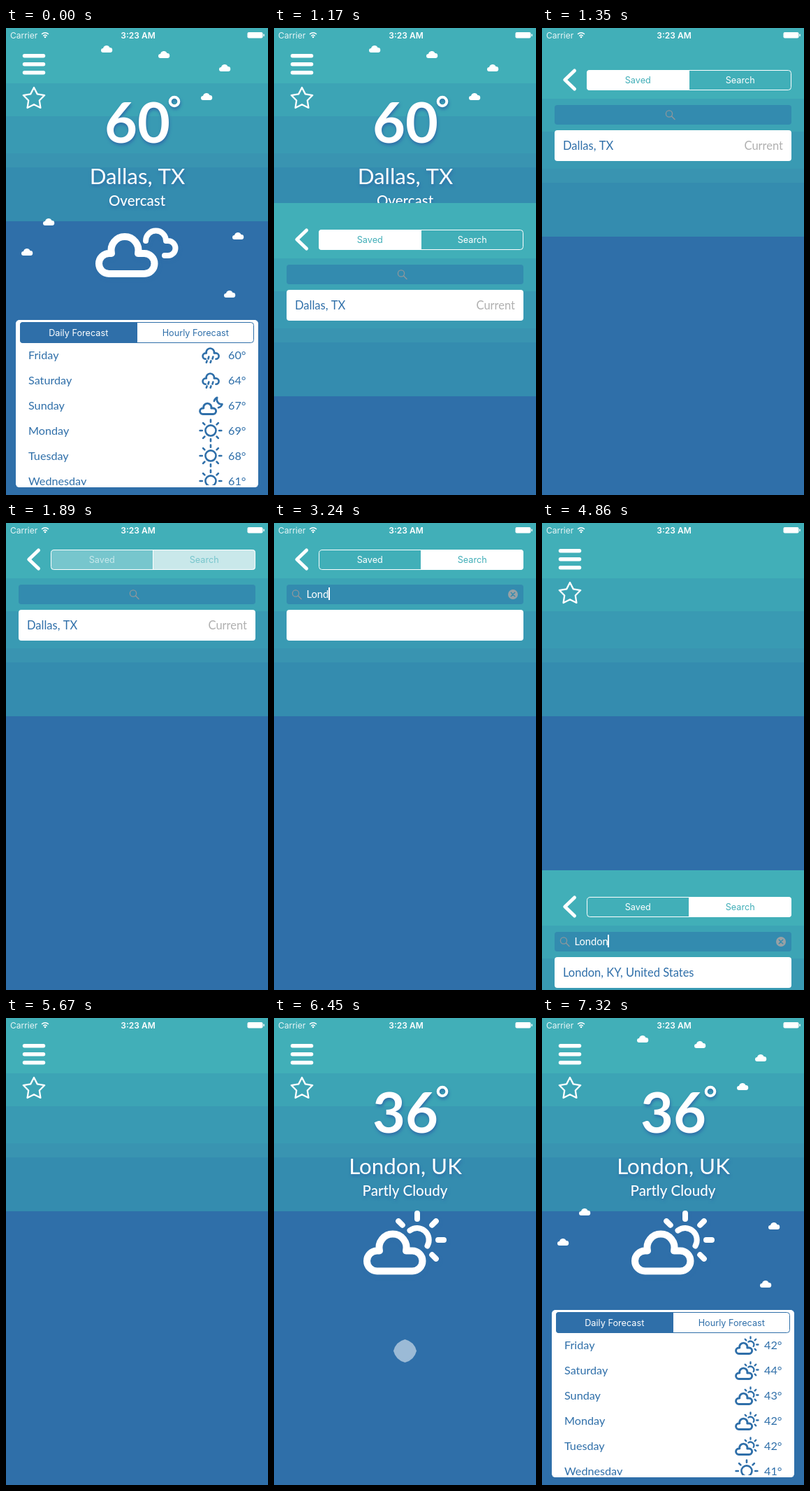
Write an HTML page with a canvas that moves like this. It is 375x667 px and loops after 8 s.

```html
<!DOCTYPE html>
<html lang="en">
<head>
<meta charset="utf-8">
<title>Weather</title>
<style>
  html, body { margin: 0; width: 100%; height: 100%; overflow: hidden; background: #2f6fa9; }
  canvas { display: block; }
</style>
</head>
<body>
<canvas id="stage" width="375" height="667"></canvas>
<script>
const ctx = document.getElementById('stage').getContext('2d');
const LOOP = 8000, BLUE = '#2f6fa9', TEAL = [64, 174, 184], WHITE = [255, 255, 255];
const BODY = 'Lato, sans-serif', UI = 'Inter, sans-serif';
const DAYS = ['Friday', 'Saturday', 'Sunday', 'Monday', 'Tuesday', 'Wednesday'];
const RESULTS = ['London, KY, United States', 'London, United Kingdom', 'London, ON, Canada',
  'Londonderry, NH, United States', 'London, OH, United States'];
const DALLAS = { now: 60, city: 'Dallas, TX', sky: 'Overcast', icon: 'overcast', temps: [60, 64, 67, 69, 68, 61],
  icons: ['rain', 'rain', 'night', 'sun', 'sun', 'sun'] };
const LONDON = { now: 36, city: 'London, UK', sky: 'Partly Cloudy', icon: 'partly', temps: [42, 44, 43, 42, 42, 41],
  icons: ['partly', 'partly', 'partly', 'partly', 'partly', 'sun'] };
const SMALL_CLOUDS = [[144, 30], [226, 38], [313, 57], [287, 98], [61, 277], [30, 320], [332, 297], [320, 380]];

// Timing helpers
const ramp = (t, from, to) => Math.min(1, Math.max(0, (t - from) / (to - from)));
const lerp = (a, b, p) => a + (b - a) * p;
const smooth = p => p * p * (3 - 2 * p);
const easeOut = p => 1 - (1 - p) ** 3;
const mix = (a, b, p) => `rgb(${a.map((v, i) => Math.round(lerp(v, b[i], p)))})`;
const bezier = (a, b, u) => 3 * a * u * (1 - u) ** 2 + 3 * b * u * u * (1 - u) + u ** 3;
function sheetEase(x) {
  let lo = 0, hi = 1;
  for (let i = 0; i < 24; i++) {
    const mid = (lo + hi) / 2;
    if (bezier(.38, .125, mid) < x) lo = mid; else hi = mid;
  }
  return bezier(.7, 1, lo);
}

// Drawing helpers
function group(alpha, draw) {
  if (alpha <= 0) return;
  ctx.save();
  ctx.globalAlpha *= alpha;
  draw();
  ctx.restore();
}
function text(str, x, y, font, color = '#fff', align = 'left') {
  ctx.font = font;
  ctx.fillStyle = color;
  ctx.textAlign = align;
  ctx.fillText(str, x, y);
}
function box(x, y, w, h, r, fill) {
  ctx.beginPath();
  ctx.roundRect(x, y, w, h, r);
  if (fill) { ctx.fillStyle = fill; ctx.fill(); }
}
function stroke(path, width, color = '#fff') {
  ctx.lineWidth = width;
  ctx.strokeStyle = color;
  ctx.lineCap = ctx.lineJoin = 'round';
  ctx.stroke(new Path2D(path));
}
function circle(x, y, r, fill) {
  ctx.beginPath();
  ctx.arc(x, y, r, 0, 7);
  if (fill) { ctx.fillStyle = fill; ctx.fill(); }
}
function shadow() {
  ctx.shadowColor = BLUE;
  ctx.shadowBlur = 4;
  ctx.shadowOffsetX = 1;
  ctx.shadowOffsetY = 3;
}

function background() {
  [[0, '#41afb8'], [79, '#3ca4b5'], [126, '#399ab3'], [179, '#3994b1'], [199, '#348caf'], [276, BLUE]]
    .forEach(([y, color]) => { ctx.fillStyle = color; ctx.fillRect(0, y, 375, 667 - y); });
}

// Weather icons share one coordinate space
const CLOUD = 'M147.5 351A14.5 14.5 0 0 1 147.5 322H151A19.5 19.5 0 1 1 189 322H198A14.5 14.5 0 0 1 198 351';
function rays(from, to, first, last) {
  let path = '';
  for (let i = first; i <= last; i++) {
    const c = Math.cos(i * Math.PI / 4), s = Math.sin(i * Math.PI / 4);
    path += `M${205 + c * from} ${317 + s * from}L${205 + c * to} ${317 + s * to}`;
  }
  return path;
}
function weatherIcon(kind, x, y, scale, color) {
  ctx.save();
  ctx.translate(x, y);
  ctx.scale(scale, scale);
  if (kind === 'overcast') {
    stroke(CLOUD + 'Z', 10, color);
    stroke('M200 304A14.5 14.5 0 0 1 229 304H232A10.5 10.5 0 0 1 232 325H227', 8, color);
  } else if (kind === 'rain') {
    stroke(CLOUD, 9, color);
    stroke('M163 340l-3 10M184 340l-3 10M154 360l-3 8M174 360l-3 8', 9, color);
  } else if (kind === 'sun') {
    stroke('M231 317A26 26 0 1 1 179 317A26 26 0 1 1 231 317Z' + rays(42, 53, 0, 7), 9, color);
  } else {
    if (kind === 'partly') stroke('M194.5 303.5A17 17 0 0 1 219.5 325.5' + rays(30, 38, -3, 1), 8, color);
    else stroke('M203 298A27 27 0 0 1 218 280A24 24 0 0 0 243 313A27 27 0 0 1 224 330', 9, color);
    ctx.translate(0, 10.5);
    stroke(CLOUD + 'Z', 10, color);
  }
  ctx.restore();
}
const ICON_OFFSET = { rain: [243, -96], sun: [233.5, -92], night: [239, -92.4], partly: [239, -92.4] };

function smallCloud(x, y) {
  ctx.fillStyle = '#fff';
  ctx.fill(new Path2D(`M${x - 5} ${y + 5}a3 3 0 0 1 0-6a5 5 0 0 1 9.5-1a3.5 3.5 0 0 1 .5 7Z`));
}

function segments(x, y, w, h, labels, selected, on, off, baseline) {
  const half = w / 2;
  group(1 - selected, () => box(x, y, half, h, [4, 0, 0, 4], on));
  group(selected, () => box(x + half, y, half, h, [0, 4, 4, 0], on));
  box(x + .5, y + .5, w - 1, h - 1, 4);
  ctx.lineWidth = 1;
  ctx.strokeStyle = on;
  ctx.stroke();
  ctx.fillStyle = on;
  ctx.fillRect(x + half - .5, y, 1, h);
  labels.forEach((label, i) =>
    text(label, x + half * (i + .5), baseline, `12.7px ${UI}`, off(i ? 1 - selected : selected), 'center'));
}

function statusBar(t) {
  text('Carrier', 6, 14.5, `12px ${UI}`, 'rgba(255,255,255,.88)');
  text('3:23 AM', 189, 14.5, `600 12px ${UI}`, '#fff', 'center');
  stroke('M51.5 8.5A6.5 6.5 0 0 1 60.5 8.5M53.7 11A3.6 3.6 0 0 1 58.3 11', 1.5);
  circle(56, 13, 1.3, '#fff');
  box(345.5, 6, 22, 8.5, 2, '#fff');
  box(368.4, 8.5, 1.4, 3.5, 1, '#fff');
  const start = t >= 5370 && t < 5670 ? 5370 : t >= 3450 && t < 3660 ? 3450 : 0;
  if (!start) return;
  const step = Math.floor((t - start) / 150);
  for (let i = 0; i < 12; i++) {
    const a = (i + step) * Math.PI / 6, c = Math.cos(a), s = Math.sin(a);
    group(.25 + i / 16, () => stroke(`M${74 + c * 2.6} ${10 + s * 2.6}L${74 + c * 4.6} ${10 + s * 4.6}`, 1));
  }
}

function menu(t) {
  group(t >= 960 && t < 1043 ? .5 : 1, () => stroke('M26.5 39.8H53.5M26.5 51.8H53.5M26.5 63.8H53.5', 5.5));
  let star = '';
  for (let i = 0; i < 10; i++) {
    const a = (i / 5 - .5) * Math.PI, r = i % 2 ? 8.2 : 16;
    star += `${i ? 'L' : 'M'}${40 + r * Math.cos(a)} ${101 + r * Math.sin(a)}`;
  }
  stroke(star + 'Z', 2.3);
}

function summary(place, alpha) {
  group(alpha, () => {
    shadow();
    text(place.now, 188, 163.5, `bold 81px ${BODY}`, '#fff', 'center');
    circle(241, 105, 6.3);
    ctx.lineWidth = 4;
    ctx.strokeStyle = '#fff';
    ctx.stroke();
    text(place.city, 188, 222.5, `31.3px ${BODY}`, '#fff', 'center');
    text(place.sky, 187.5, 253.5, `500 20.5px ${BODY}`, '#fff', 'center');
    weatherIcon(place.icon, 0, 26 * (1 - alpha), 1, '#fff');
  });
}

function forecast(place, grow, alpha) {
  const w = lerp(33, 347, grow), h = lerp(33, 239, grow);
  const cx = 187.5, cy = lerp(475.5, 536.5, grow), r = lerp(16.5, 4, grow), k = r * .2;
  const l = cx - w / 2, right = cx + w / 2, top = cy - h / 2, b = cy + h / 2;
  const card = new Path2D(`M${l + r} ${top}H${right - r}Q${right - k} ${top + k} ${right} ${top + r}
    V${b - r}Q${right - k} ${b - k} ${right - r} ${b}H${l + r}Q${l + k} ${b - k} ${l} ${b - r}
    V${top + r}Q${l + k} ${top + k} ${l + r} ${top}Z`);
  group(lerp(.52, 1, grow), () => { ctx.fillStyle = '#fff'; ctx.fill(card); });
  group(alpha, () => {
    ctx.clip(card);
    segments(20, 420, 335, 30, ['Daily Forecast', 'Hourly Forecast'], 0, BLUE,
      p => mix(WHITE, [47, 111, 169], p), 439.5);
    box(14, 451, 347, 202, 0);
    ctx.clip();
    DAYS.forEach((day, i) => {
      const y = 467 + 36 * i, kind = place.icons[i], [dx, dy] = ICON_OFFSET[kind];
      text(day, 32, y + 6, `16.2px ${BODY}`, BLUE);
      text(place.temps[i] + '°', 318, y + 6, `16.2px ${BODY}`, BLUE);
      weatherIcon(kind, dx, y + dy, .29, BLUE);
    });
  });
}

function home(t) {
  background();
  menu(t);
  if (t < 3000) {
    SMALL_CLOUDS.forEach(([x, y]) => smallCloud(x, y));
    summary(DALLAS, 1);
    forecast(DALLAS, 1, 1);
    return;
  }
  summary(LONDON, easeOut(ramp(t, 5880, 6270)));
  if (t < 6450) return;
  const slide = easeOut(ramp(t, 6450, 7230));
  group(ramp(t, 6450, 7320), () => SMALL_CLOUDS.forEach(([x, y]) =>
    smallCloud(lerp(x < 187 ? -10 : 385, x, slide), y)));
  forecast(LONDON, smooth(ramp(t, 6450, 7050)), ramp(t, 6900, 7320));
}

function cursorAlpha(t) {
  return t < 2250 ? 0 : t < 4650 ? 1 - ramp(t, 4140, 4290) : ramp(t, 4650, 4800);
}

function searchSheet(t) {
  background();
  stroke('M46.5 39L32.8 52L46.5 65', 5);
  segments(64, 38, 293, 29, ['Saved', 'Search'], ramp(t, 1740, 1950), '#fff',
    p => mix(TEAL, WHITE, p), 57);

  box(18, 88, 339, 28, 4, '#338baf');
  const iconX = lerp(182, 31, smooth(ramp(t, 1950, 2250)));
  circle(iconX, 100.5, 4.6);
  ctx.lineWidth = 1.3;
  ctx.strokeStyle = '#8d979c';
  ctx.stroke();
  stroke(`M${iconX + 3.5} 104l4.5 4.5`, 1.5, '#8d979c');
  const typed = t < 2880 ? '' : 'London'.slice(0, 1 + Math.floor((t - 2880) / 110));
  text(typed, 46.5, 106.5, `14.7px ${BODY}`);
  const caret = Math.round(46 + ctx.measureText(typed).width);
  group(cursorAlpha(t), () => { ctx.fillStyle = '#fff'; ctx.fillRect(caret, 92, 2, 18); });
  if (typed) {
    circle(342, 102, 7, '#98a1a5');
    stroke('M339.3 99.3l5.4 5.4M344.7 99.3l-5.4 5.4', 1.5, '#338baf');
  }

  const open = smooth(ramp(t, 3505, 3870)) - smooth(ramp(t, 4650, 4840));
  box(18, 124, 339, lerp(44, 220, open), 4, '#fff');
  ctx.save();
  ctx.clip();
  const leave = ramp(t, 1950, 2340), rowFont = `16.5px ${BODY}`;
  group(1 - leave, () => {
    const x = -100 * smooth(leave);
    text('Dallas, TX', 30 + x, 151.5, rowFont, BLUE);
    text('Current', 345 + x, 151.5, rowFont, '#b0b0b0', 'right');
  });
  if (t >= 3505) RESULTS.forEach((name, i) => text(name, 30, 151.5 + 44 * i, rowFont, BLUE));
  ctx.restore();
}

function render(t) {
  const top = 667 * (1 - sheetEase(ramp(t, 1043.5, 1543.5)) + sheetEase(ramp(t, 4708, 5208)));
  if (top > .5) home(t);
  if (top < 667) {
    ctx.save();
    ctx.translate(0, Math.round(top));
    searchSheet(t);
    ctx.restore();
  }
  statusBar(t);
}

let start;
function frame(now) {
  start ??= now;
  render((now - start) % LOOP);
  requestAnimationFrame(frame);
}
requestAnimationFrame(frame);
</script>
</body>
</html>
```
